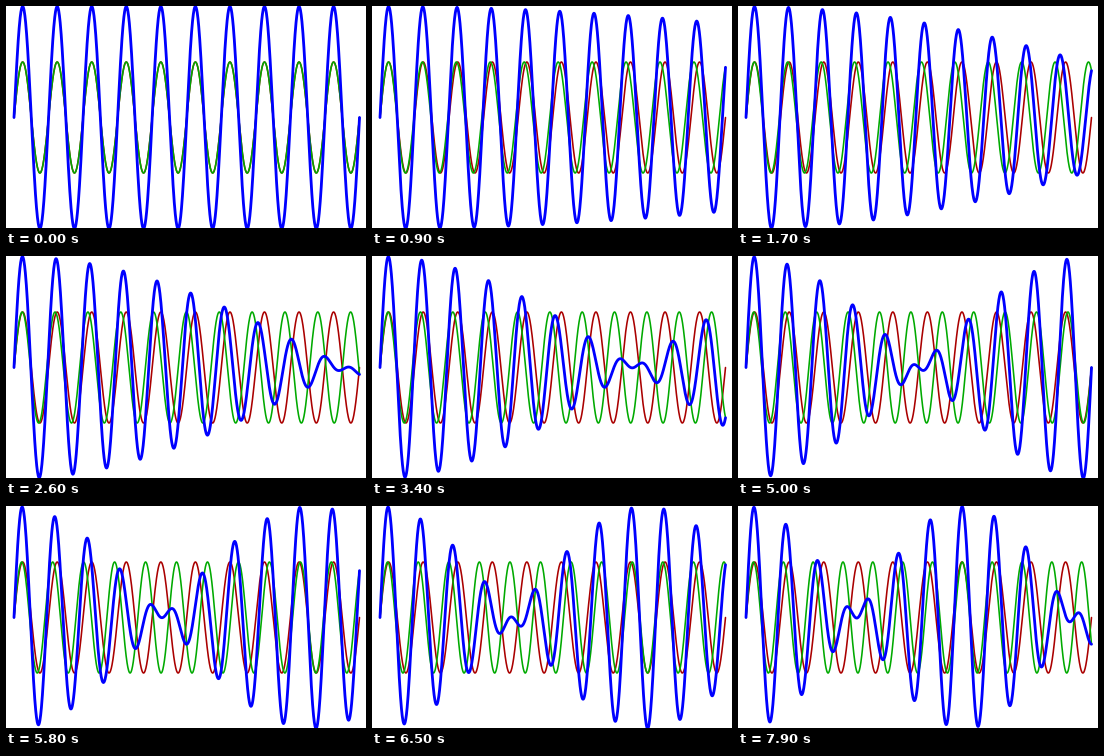
Write a matplotlib script that moves like this. It is 360 px wide and 222 px high and loops after 8 s.

```python
import numpy as np
import matplotlib.pyplot as plt
from matplotlib.animation import FuncAnimation

W, H, DPI = 360, 222, 100
FRAMES, INTERVAL = 80, 100
LEFT, RIGHT = 8, 353.5
MID, AMP = 111.5, 55.5
CYCLES = 10          # periods of the fixed wave across the stage
DRIFT = 0.02         # extra periods of the second wave per frame

fig = plt.figure(figsize=(W / DPI, H / DPI), dpi=DPI, facecolor="white")
ax = fig.add_axes([0, 0, 1, 1])
ax.set_xlim(0, W)
ax.set_ylim(H, 0)
ax.axis("off")

u = np.linspace(0, 1, 1400)
x = LEFT + (RIGHT - LEFT) * u


def wave(cycles):
    return np.sin(2 * np.pi * cycles * u)


def to_y(values):
    return MID - AMP * values


def add_line(color, px):
    line, = ax.plot(x, to_y(wave(CYCLES)), color=color, lw=px * 72 / DPI,
                    solid_capstyle="round", solid_joinstyle="round")
    return line


fixed = add_line("#aa0000", 1.6)
shifted = add_line("#00aa00", 1.6)
total = add_line("#0000ff", 2.8)


def update(i):
    a, b = wave(CYCLES), wave(CYCLES + DRIFT * i)
    shifted.set_ydata(to_y(b))
    total.set_ydata(to_y(a + b))
    return shifted, total


update(0)
anim = FuncAnimation(fig, update, frames=FRAMES, interval=INTERVAL,
                     repeat=True, repeat_delay=0)
plt.show()
```
